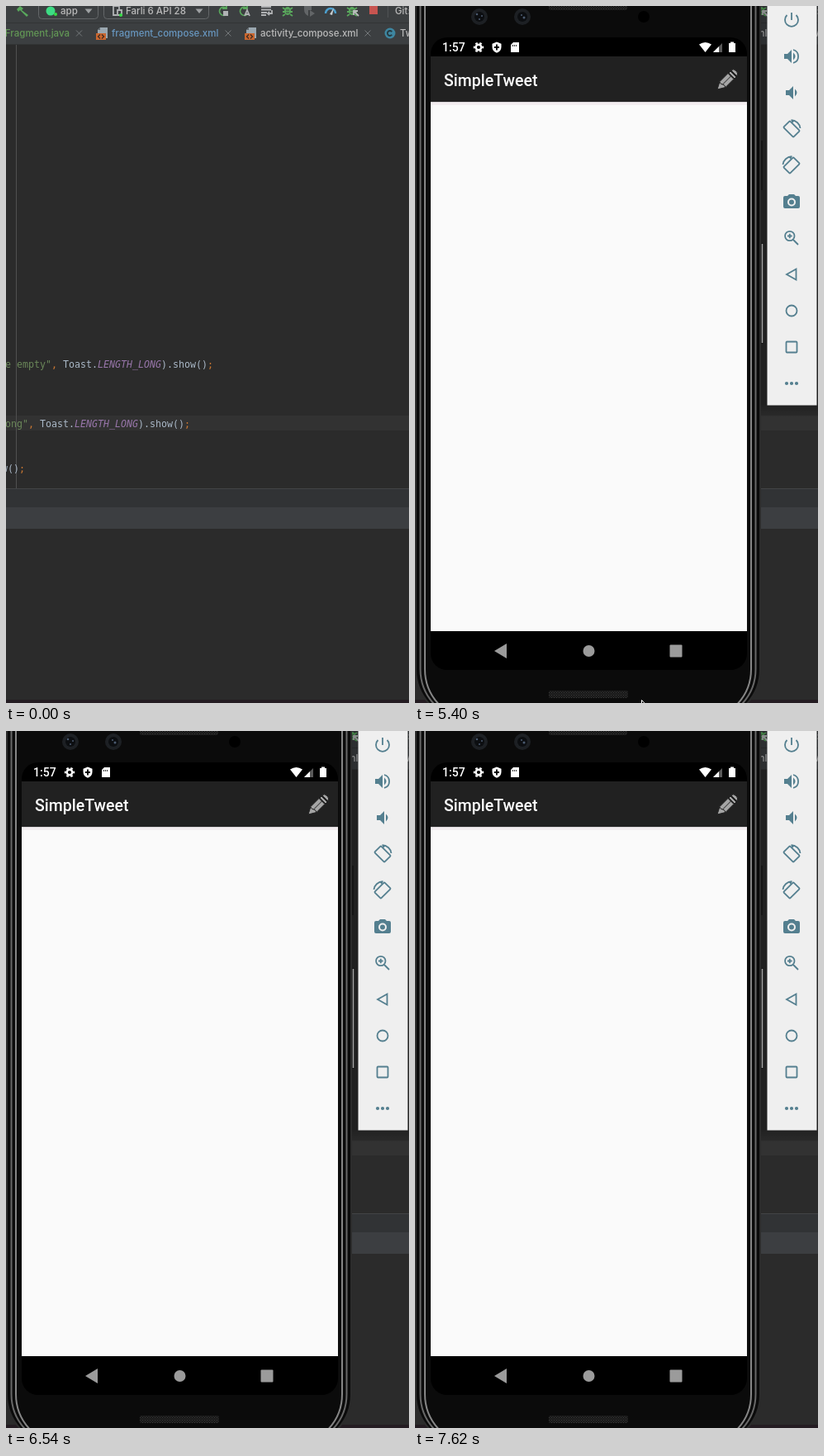
An HTML page that plays this animation: 488x844 px, repeating every 8 s.

```html
<!DOCTYPE html>
<html lang="en">
<head>
<meta charset="utf-8">
<title>Emulator over editor</title>
<style>
html, body { margin: 0; width: 100%; height: 100%; overflow: hidden; background: #2b2b2b; }
svg { display: block; }
.ui { font: 500 11.5px Inter, sans-serif; fill: #bbb; }
.code { font: 11.63px "DejaVu Sans Mono", monospace; fill: #a9b7c6; white-space: pre; }
.str { fill: #6a8759; }
.sep { fill: #cc7832; }
.const { fill: #9876aa; font-style: italic; }
.app { font-family: Roboto, sans-serif; font-weight: 500; fill: #fff; }
.line { fill: none; stroke-width: 1.8; }
.side { fill: #547f8f; stroke: #547f8f; stroke-width: 0; }
.green { fill: #59a85c; stroke: #59a85c; }
</style>
</head>
<body>
<svg width="488" height="844" viewBox="0 0 488 844">
  <defs>
    <path id="close" d="M-3.5-3.5l7 7m0-7l-7 7" stroke="#74787a"/>
    <g id="xml">
      <path d="M5-7h9v13H2V-4z" fill="#9aa7b0"/>
      <path d="M5-7v3H2z" fill="#5d656a"/>
      <path d="M0 0h12v8H0z" fill="#c9662f"/>
      <path d="M5 1.5L2.5 4 5 6.5M7 1.5L9.5 4 7 6.5" fill="none" stroke="#3b2a22" stroke-width="1.2"/>
    </g>
    <g id="bug" class="green">
      <ellipse rx="4" ry="5" stroke="none"/>
      <path class="line" d="M-6-4l3 2M-6 1h3M-6 6l3-2M6-4l-3 2M6 1H3M6 6L3 4"/>
      <path d="M-2-1h4M-2 2h4" stroke="#3c3f41"/>
    </g>
    <path id="redo" class="line" stroke="#59a85c" d="M4 4A5 5 0 1 1 3-4M4-8v5H-1"/>
    <path id="drop" d="M-4.5-2.5h9L0 3z" fill="#9da0a2"/>
    <g id="lens">
      <circle r="10" fill="#1d2024"/><circle r="6" fill="#0c0e11"/>
    </g>
    <linearGradient id="shade" x2="0" y2="1">
      <stop stop-opacity=".22"/><stop offset="1" stop-opacity="0"/>
    </linearGradient>
    <pattern id="mesh" width="3" height="3" patternUnits="userSpaceOnUse">
      <path d="M0 0h3v3H0z" fill="#171717"/><path d="M0 0h1v1H0zM1.5 1.5h1v1h-1z" fill="#393939"/>
    </pattern>
  </defs>

  <g id="ide">
    <path d="M0 0h488v844H0z" fill="#2b2b2b"/>
    <path d="M0 0h488v46H0z" fill="#3c3f41"/>
    <path d="M0 20.5h488M0 46.5h488" stroke="#323435"/>
    <path d="M0 496h488v18H0z" fill="#323232"/>
    <path d="M12.5 47v537" stroke="#505050"/>
    <path d="M0 584h488v23H0z" fill="#313335"/>
    <path d="M0 584.5h488" stroke="#424446"/>
    <path d="M0 607h488v26H0z" fill="#3c3e41"/>
    <path d="M0 840h488v4H0z" fill="#241c22"/>

    <path d="M13 4l4-4 4 3-2 2 8 6-2 2-8-8-2 2z" fill="#59a85c"/>
    <g fill="none" stroke="#646769">
      <rect x="39.5" y="-8" width="72" height="23.5" rx="4"/>
      <rect x="118.5" y="-8" width="127" height="23.5" rx="4"/>
    </g>
    <circle cx="54" cy="6" r="5.5" fill="#3ddc84"/>
    <circle cx="60" cy="10" r="2" fill="#35dc45"/>
    <use href="#drop" x="100" y="6"/><use href="#drop" x="234" y="6"/>
    <path class="line" stroke="#afb1b3" d="M134 11h-4V0h7v5M135 5h5v6h-5z"/>
    <circle cx="139" cy="11" r="2" fill="#35dc45"/>
    <use href="#redo" x="263" y="6"/><path d="M263 6h6v6h-6z" fill="#afb1b3"/>
    <use href="#redo" x="288" y="6"/>
    <path class="line" stroke="#afb1b3" d="M289 12l3-7 3 7m-5-2h4"/>
    <path class="line" stroke="#afb1b3" d="M309 1h12M309 4.5h12M309 8h7M309 11h6M322 5v4h-5m2-2l-2 2 2 2"/>
    <use href="#bug" x="341" y="6"/>
    <path d="M361 0h9v5h-4v7q-5-2-5-8zM368 5l6 4-6 4z" fill="#626567"/>
    <path fill="none" stroke="#4c9fce" d="M387 9a6 6 0 0 1 12 0" stroke-width="2.5"/>
    <path d="M392 10l5-8-2 9z" fill="#c9cdcf"/>
    <use href="#bug" x="419" y="6"/>
    <path class="line" stroke="#b9bbbc" d="M427 12l-6-6m0 5V6h5"/>
    <path d="M440 0h10v10h-10z" fill="#c75450"/>
    <path d="M462.5 0v14" stroke="#505355"/>

    <g class="ui">
      <text x="66" y="10">app</text>
      <text x="145" y="10">Farli 6 API 28</text>
      <text x="471" y="10">Git:</text>
      <text x="77" y="37" text-anchor="end" fill="#629755">Fragment.java</text>
      <text x="128" y="37" fill="#6897c0">fragment_compose.xml</text>
      <text x="308" y="37">activity_compose.xml</text>
      <text x="477" y="37">Tw</text>
    </g>
    <use href="#close" x="88.5" y="33"/><use href="#close" x="269" y="33"/><use href="#close" x="438" y="33"/>
    <use href="#xml" x="109" y="33"/><use href="#xml" x="289" y="33"/>
    <circle cx="465" cy="33" r="6.5" fill="#3e86a0"/>
    <path class="line" stroke="#263940" d="M467.3 31.2a3 3 0 1 0 0 3.6"/>

    <g class="code">
      <text x="-1" y="438"><tspan class="str">e empty"</tspan><tspan class="sep">, </tspan>Toast.<tspan class="const">LENGTH_LONG</tspan>).show()<tspan class="sep">;</tspan></text>
      <text x="-1" y="510"><tspan class="str">ong"</tspan><tspan class="sep">, </tspan>Toast.<tspan class="const">LENGTH_LONG</tspan>).show()<tspan class="sep">;</tspan></text>
      <text x="-5" y="564">w()<tspan class="sep">;</tspan></text>
    </g>
  </g>

  <g id="emulator" display="none">
    <path d="M418 0h70v483h-70z" opacity=".25"/>
    <path d="M418 483h70v16h-70z" fill="url(#shade)"/>
    <path d="M418 163h3v60h-3z" fill="#151515"/>
    <path d="M418 287h4v122h-4z" fill="#161616"/>
    <path d="M420.5 288v120" stroke="#a5a5a5" stroke-width="1.5"/>

    <g fill="#0b0b0b" stroke-width="2">
      <rect x="1" y="-60" width="417" height="925" rx="62" stroke="#2c2c2c"/>
      <rect x="6.5" y="-60" width="406" height="925" rx="62" stroke="#686868"/>
      <rect x="12" y="-60" width="395" height="925" rx="62" stroke="#868686"/>
    </g>
    <path d="M162-5h95v7q0 3-3 3h-89q-3 0-3-3z" fill="url(#mesh)"/>
    <rect x="162" y="829" width="96" height="9" rx="2" fill="url(#mesh)"/>
    <use href="#lens" x="78" y="13"/><use href="#lens" x="130" y="13"/>
    <circle cx="277" cy="13" r="7"/>
    <g fill="#4b5b70">
      <circle cx="75" cy="10" r="1.3"/><circle cx="81" cy="12" r="1"/><circle cx="78" cy="16" r="1"/>
      <circle cx="129" cy="11" r="1"/><circle cx="132" cy="14" r="1.5"/>
    </g>

    <rect x="19" y="38" width="383" height="766" rx="20"/>
    <path d="M19 61h383v55H19z" fill="#212121"/>
    <path d="M19 116h383v641H19z" fill="#fafafa"/>
    <path d="M19 116h383v1H19z" fill="#d8d4d6"/>
    <path d="M19 117h383v3H19z" fill="#f3edf0"/>
    <g class="app">
      <text x="33" y="55" font-size="14">1:57</text>
      <text x="35" y="97" font-size="19.5">SimpleTweet</text>
    </g>
    <g fill="#fff">
      <g fill="none" stroke="#fff">
        <circle cx="77" cy="50" r="3.3" stroke-width="2.4"/>
        <circle cx="77" cy="50" r="5.2" stroke-width="2" pathLength="12" stroke-dasharray="1" stroke-dashoffset=".5"/>
      </g>
      <path d="M99 43.5l5.5 2.2v4q0 4.8-5.5 7-5.5-2.200-5.5-7v-4z"/>
      <path d="M119 44h7v12h-10v-9z"/>
      <path d="M344 46.5q7.5-5 15 0L351.5 56z"/>
      <path d="M361 56l11-11v11z" opacity=".35"/><path d="M361 56l7-7v7z"/>
      <path d="M380 45h2v-1.5h4V45h2v11h-8z"/>
    </g>
    <path d="M99 46.500v7M96 50h6" stroke="#000" stroke-width="1.8"/>
    <path d="M118.5 47v2m2-2v2m2-2v2" stroke="#000" stroke-width=".8"/>
    <g fill="#a5a5a5" stroke="#212121">
      <path d="M366 101l3-9.500 10-10 7 7-10 10z"/>
      <path d="M380 81l2-2 7 7-2 2zM383 78q2.500-2.500 5 0l1.500 1.500q2.500 2.500 0 5z"/>
      <path d="M369 92q1 3 3.500 3t3.500 3.500M372.500 95l10-10" fill="none"/>
    </g>
    <g fill="#9b9b9b">
      <path d="M96 781l15-9v18z"/><circle cx="210.5" cy="781" r="7"/>
      <rect x="308.5" y="773.5" width="15" height="15" rx="1"/>
    </g>

    <path d="M426.5 0h60v483.5h-60z" fill="#efefef"/>
    <g class="side">
      <path class="line" transform="translate(456 17)" d="M0-9V0M-5.500-6A8 8 0 1 0 5.500-6"/>
      <g transform="translate(456 61)">
        <path d="M-9-3h4l5-5v16l-5-5h-4z"/>
        <path d="M2-4.500q5 4.500 0 9z"/><path class="line" d="M2-8a8.300 8.300 0 0 1 0 16"/>
      </g>
      <path transform="translate(456 105)" d="M-7-3h4l5-5v16l-5-5h-4zM4-4.500q5 4.500 0 9z"/>
      <g id="turn" transform="translate(456 149)">
        <rect class="line" x="-8.500" y="-5.500" width="17" height="11" rx="1" transform="rotate(45)"/>
        <path class="line" d="M0-10.500A10.500 10.500 0 0 1 10.500-1"/>
        <path d="M-1-11.500l5 .5-3 4z"/>
      </g>
      <use href="#turn" transform="translate(912 44) scale(-1 1)"/>
      <path fill-rule="evenodd" transform="translate(456 237)" d="M-3-9h6l2 2h3q2 0 2 2V6q0 2-2 2H-8q-2 0-2-2V-5q0-2 2-2h3zM-5 .500a5 5 0 1 0 10 0 5 5 0 1 0-10 0M-3 .500a3 3 0 1 0 6 0 3 3 0 1 0-6 0"/>
      <path class="line" transform="translate(456 281)" d="M3.500-2.500a5.700 5.700 0 1 1-11.400 0 5.700 5.700 0 1 1 11.400 0M2 2l6 6M-5-2.500H.6M-2.200-5.300V.3"/>
      <g transform="translate(456 325)">
        <path class="line" d="M-6 0L5.500-6.500v13z"/>
        <circle class="line" cy="44" r="6.500"/>
        <rect class="line" x="-6.500" y="81.500" width="13" height="13" rx="1"/>
      </g>
      <circle cx="450" cy="457" r="2.1"/><circle cx="456" cy="457" r="2.1"/><circle cx="462" cy="457" r="2.1"/>
    </g>
  </g>

  <path id="cursor" display="none" d="M.5.5V14l3-2.800 2.300 5.300 2.300-1-2.300-5H10z" fill="#000" stroke="#fff"/>
</svg>
<script>
const emulator = document.getElementById("emulator");
const cursor = document.getElementById("cursor");
const visits = [
  { from: 5400, to: 6000, x: 274, y: 840 },
  { from: 6900, to: 7050, x: 301, y: 809 }
];
const show = (el, on) => el.setAttribute("display", on ? "inline" : "none");

function draw() {
  const t = performance.now() % 8000;
  const visit = visits.find(v => t >= v.from && t < v.to);
  show(emulator, t >= 150);
  show(cursor, visit);
  if (visit) cursor.setAttribute("transform", `translate(${visit.x} ${visit.y})`);
  requestAnimationFrame(draw);
}
draw();
</script>
</body>
</html>
```
